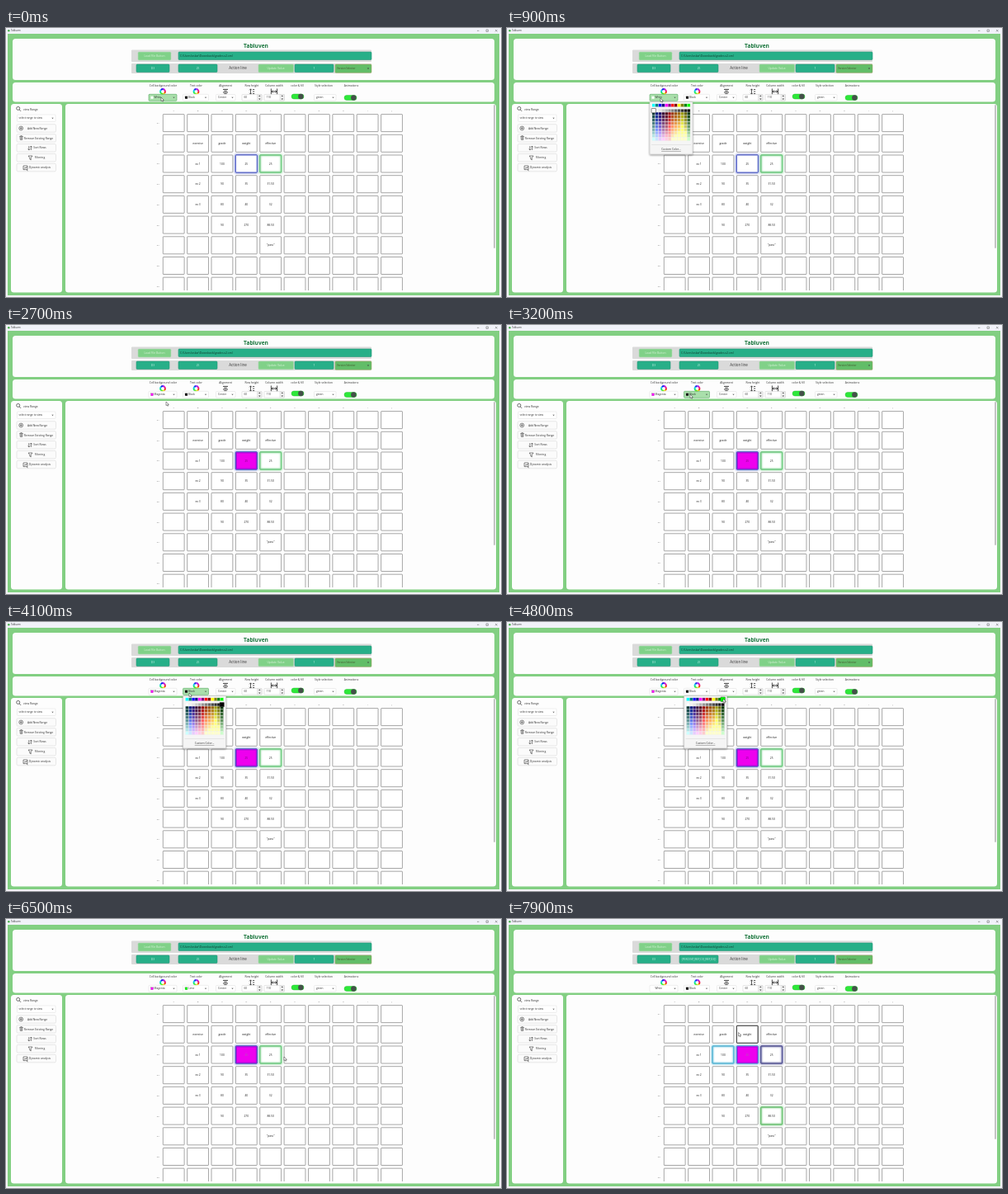
An HTML page that plays this animation: 600x326 px, repeating every 8000 ms.

```html
<!DOCTYPE html>
<html lang="en">
<head>
<meta charset="utf-8">
<title>Spreadsheet colors</title>
<style>
html, body { margin: 0; width: 100%; height: 100%; overflow: hidden; background: #f3f4f8; }
svg { display: block; width: 600px; height: 326px; }
text { font-family: "Open Sans", "Noto Sans", sans-serif; }
</style>
</head>
<body>
<svg id="stage" viewBox="0 0 600 326">
  <defs>
    <filter id="shadow" x="-20%" y="-20%" width="140%" height="150%">
      <feDropShadow dx="0" dy="1" stdDeviation="1.3" flood-opacity=".45"/>
    </filter>
    <filter id="glow" x="-30%" y="-30%" width="160%" height="160%"><feGaussianBlur stdDeviation="1"/></filter>
    <clipPath id="sheetClip"><rect x="72" y="92" width="518" height="226"/></clipPath>
    <clipPath id="valueClip"><rect x="209.5" y="43" width="46" height="12"/></clipPath>
  </defs>
  <g id="base"></g>
  <g id="live"></g>
  <path id="cursor" d="M0 0V4.6L1.1 3.7L1.9 5.3L2.7 4.9L2 3.4H3.4Z" fill="#fff" stroke="#222" stroke-width=".45"/>
</svg>
<script>
const LOOP = 8000;
const GREEN = '#82cf82', TEAL = '#27af88', LIGHT = '#80d188', INK = '#333';
const OPEN_BG = 300, PICK_BG = 2700, OPEN_TEXT = 3700, PICK_TEXT = 5800, SELECT_E3 = 7300;

const box = (x, y, w, h, fill, stroke = 'none', r = 0, lw = .6, extra = '') =>
  `<rect x="${x}" y="${y}" width="${w}" height="${h}" rx="${r}" fill="${fill}" stroke="${stroke}" stroke-width="${lw}" ${extra}/>`;
const label = (s, x, y, size = 3.4, fill = INK, extra = 'text-anchor="middle"') =>
  `<text x="${x}" y="${y + size * .36}" font-size="${size}" fill="${fill}" ${extra}>${s}</text>`;
const left = (s, x, y, size, fill) => label(s, x, y, size, fill, '');
const line = (d, stroke = INK, lw = .7) =>
  `<path d="${d}" fill="none" stroke="${stroke}" stroke-width="${lw}"/>`;
const arrow = (x, y) => `<path d="M${x - 1.2} ${y - .6}h2.4l-1.2 1.4z" fill="#444"/>`;
const combo = (x, y, w, h, fill = '#fff', stroke = '#ddd') =>
  box(x, y, w, h, fill, stroke, 1, .5) + arrow(x + w - 3.5, y + h / 2);

// Sheet
const PITCH_X = 29.37, PITCH_Y = 24.7;
const cellX = c => 190.3 + c * PITCH_X;
const cellY = r => 104.6 + r * PITCH_Y;
const cell = (c, r, fill, stroke, lw = .6, extra = '') =>
  box(cellX(c), cellY(r), 25.8, 21, fill, stroke, .5, lw, extra);
const VALUES = [
  [], ['exercise', 'grade', 'weight', 'effective'], ['ex 1', '100', '', '25'],
  ['ex 2', '90', '35', '31.50'], ['ex 3', '80', '40', '32'],
  ['', '90', '270', '88.50'], ['', '', '', '"pass"'], [], []
];
const glowCell = (c, r, color, fill = 'none') =>
  cell(c, r, 'none', color, 2, 'filter="url(#glow)" opacity=".75"') + cell(c, r, fill, color, .9);

function sheet() {
  let out = '';
  for (let c = 0; c < 10; c++) out += label('ABCDEFGHIJ'[c], cellX(c) + 12.9, 99.8, 2.5, '#666');
  VALUES.forEach((row, r) => {
    out += label('0' + (r + 1), 184.3, cellY(r) + 10.5, 2.5, '#666');
    for (let c = 0; c < 10; c++) out += cell(c, r, '#fff', '#6c6c6c');
    row.forEach((s, i) => out += label(s, cellX(i + 1) + 12.9, cellY(r) + 10.5, 3.3, '#222'));
  });
  return `<g clip-path="url(#sheetClip)">${out}</g>`;
}

function wheel(cx, cy) {
  let out = '';
  for (let i = 0; i < 8; i++) {
    const at = k => `${cx + 2.9 * Math.cos(k * Math.PI / 4)} ${cy + 2.9 * Math.sin(k * Math.PI / 4)}`;
    out += line(`M${at(i)}A2.9 2.9 0 0 1 ${at(i + 1)}`, `hsl(${i * 45 + 10} 85% 50%)`, 2);
  }
  return out;
}

function toggle(x, y) {
  return box(x, y, 15, 6, '#2ee83a', '#22b82c', 3, .4) + `<circle cx="${x + 11.3}" cy="${y + 3}" r="3.2" fill="#45504a"/>`;
}

function spinner(x, w, s) {
  return box(x, 80.5, w, 7.5, '#fff', '#ccc', .8, .5) + left(s, x + 2.5, 84.3, 3.2) +
    box(x + w - 5.5, 80.5, 5.5, 7.5, '#eee', '#ccc', .5, .4) + arrow(x + w - 2.7, 86.2) +
    `<path d="M${x + w - 3.9} 83h2.4l-1.2-1.4z" fill="#444"/>`;
}

function header() {
  return box(0, 0, 600, 7, '#f1f2f9') + '<circle cx="3.3" cy="3.2" r="1.3" fill="#4caf50"/>' +
    left('Tabluven', 6, 3.2, 2.8) +
    line('M571 3.3h2.4M582 2h2.4v2.4h-2.4zM593 2l2.5 2.5M595.5 2l-2.5 2.5', '#444', .45) +
    box(2, 7, 596, 317, GREEN) +
    box(8, 13, 584, 50, '#fdfdfd', 'none', 3.5) + box(8, 66, 584, 23.5, '#fdfdfd', 'none', 3.5) +
    box(6, 92, 62, 228.5, '#fdfdfd', 'none', 3.5) + box(72, 92, 522, 228.5, '#fdfdfd', 'none', 3.5) +
    label('Tabluven', 303, 21.3, 6.6, '#16743a', 'text-anchor="middle" font-weight="700"') +
    box(152, 26.5, 291, 14.5, '#dadada', 'none', 1) + box(152, 43, 291, 12, '#dadada', 'none', 1) +
    box(160, 29, 40, 10, LIGHT, '#b7dcba', 1.2) + label('Load File Button', 180, 34, 3.3, '#d9f2dc') +
    box(209, 29, 234, 9.5, TEAL, '#239777', 1) + left('C:\\Users\\oskar\\Downloads\\grades-v2.xml', 211, 33.8, 3.3, '#12382d') +
    box(158, 44, 40, 9.5, TEAL, '#239777', 1) + box(209, 44, 47, 9.5, TEAL, '#239777', 1) +
    label('Action line', 281, 48.8, 4.4) +
    box(306, 44, 42.5, 9.8, LIGHT, '#a6d8ab', 1.2) + label('Update Value', 327, 48.8, 3.4, '#d9f2dc') +
    box(350, 44, 47, 9.5, TEAL, '#239777', 1) + label('1', 373.5, 48.8, 3.3, '#e5fff6') +
    box(399, 44, 44, 10.3, '#62bd68', '#a3a35a', 1, .5) + left('Version Selector', 401, 49.2, 3, '#45502d') + arrow(439, 49.2);
}

function toolbar() {
  const heads = [['Cell background color', 190.5], ['Text color', 230.5], ['Alignment', 266], ['Row height', 298],
    ['Column width', 325], ['color &amp; fill', 353], ['Style selection', 385], ['Animations', 418.5]];
  return heads.map(([s, x]) => label(s, x, 70.3, 3.3)).join('') +
    wheel(190, 77) + wheel(230.5, 77) +
    line('M263 74.4h6M264.3 76.2h3.4M263 78h6M264.3 79.8h3.4', INK, .9) +
    line('M296.5 74v6M295.2 75.3l1.3-1.5 1.3 1.5M295.2 78.8l1.3 1.5 1.3-1.5M299 74.5h2.2M299 77h2.2M299 79.5h2.2', INK, .8) +
    line('M321.4 73.5v7M328.6 73.5v7M322.4 77h5.2M323.6 75.7l-1.5 1.3 1.5 1.3M326.4 75.7l1.5 1.3-1.5 1.3', INK, .9) +
    combo(254.5, 80.5, 23.5, 7.5) + left('Center', 257, 84.3, 3.2) +
    spinner(286, 24, '60') + spinner(313, 24.5, '110') + toggle(346, 80) + toggle(410, 81.5) +
    combo(373.5, 80.5, 26.5, 7.5) + left('green', 376, 84.3, 3.2);
}

function sidebar() {
  const items = ['Add New Range', 'Remove Existing Range', 'Sort Rows', 'Filtering', 'Dynamic analysis'];
  const icons = [
    'M15.8 121.5a2.4 2.4 0 1 0 4.8 0a2.4 2.4 0 1 0-4.8 0M18.2 120.1v2.8M16.8 121.5h2.8',
    'M16.4 131.4h4.2M17.6 130.6h1.8M17 131.4l.3 4h2.4l.3-4M18.5 132.3v2.2',
    'M27.8 143v5l-1.3-1.4M30.4 148v-5l1.3 1.4M27.8 148l1.3-1.4M30.4 143l-1.2 1.4',
    'M27 155h5l-1.8 2.3v2.6l-1.4-.9v-1.7z',
    'M21 167h5v4.6h-5zM22 170.5l1.2-1.5 1 1 1.2-2M25 172l1.5 1'
  ];
  const textX = [38, 39.5, 41, 41, 41];
  return line('M12.7 97.4a2 2 0 1 0 4 0a2 2 0 1 0-4 0M16.1 98.9l2 2') + left('view Range', 21, 98.4, 3.4) +
    combo(13.5, 105, 46.5, 8.5) + left('select range to view', 15.5, 109.2, 3.1) +
    items.map((s, i) => {
      const y = 121.5 + i * 11.9;
      return box(13, y - 4.8, 47.5, 9.5, '#fbfbfb', '#d3d3d3', 1.5, .5) + line(icons[i], INK, .6) +
        label(s, textX[i], y, 3.3);
    }).join('') + box(591, 93, 2, 174, '#c4c4c4', 'none', 1);
}

// Color picker
const SWATCH = 3.85;
const NAMED = 'aqua teal blue navy fuchsia purple red maroon yellow olive green lime'.split(' ');
const GRAYS = [255, 242, 230, 204, 179, 153, 128, 102, 77, 51, 26, 0];
const HUES = ['0,51,51', '0,26,128', '26,0,104', '51,0,51', '77,0,26', '153,0,0', '153,51,0',
  '153,77,0', '153,102,0', '153,153,0', '102,102,0', '0,51,0'].map(s => s.split(',').map(Number));

function gridColor(c, r) {
  const rgb = r ? HUES[c].map(v => Math.min(255, Math.round(v + 25.5 * (r - 1)))) : Array(3).fill(GRAYS[c]);
  return `rgb(${rgb})`;
}

function popup(x, px, py, current) {
  const x0 = x + 2.9;
  const swatch = (c, y, fill) => box(x0 + c * SWATCH, y, SWATCH, SWATCH, fill, '#eee', 0, .35);
  let out = box(x, 89.5, 52, 63.5, '#f5f5f5', '#bbb', .8, .5, 'filter="url(#shadow)"');
  for (let c = 0; c < 12; c++) {
    out += swatch(c, 91.8, NAMED[c]);
    for (let r = 0; r < 10; r++) out += swatch(c, 98.2 + r * SWATCH, gridColor(c, r));
  }
  const hover = Math.floor((px - x0) / SWATCH);
  if (py > 90 && hover >= 0 && hover < 12)
    out += box(x0 + hover * SWATCH - .9, 90.9, 5.6, 5.6, NAMED[hover], '#555', .3, .5);
  else
    out += box(x0 + current * SWATCH - .8, 97.5, 5.3, 5.3, gridColor(current, 0), '#444', .3, .6);
  return out + line(`M${x + 2} 141.5h48`, '#d5d5d5', .5) +
    label('Custom Color...', x + 26, 147.2, 3.3, INK, 'text-anchor="middle" text-decoration="underline"');
}

// Pointer: time, x, y
const PATH = [[0, 188, 84], [900, 186, 85], [1500, 186, 86], [2000, 201, 93], [2250, 201, 93], [2500, 194, 93],
  [2700, 194, 93], [3100, 222, 84], [4100, 222, 86], [4550, 225, 93], [4750, 262, 93], [5800, 262, 93],
  [6350, 337, 167], [6850, 337, 167], [7200, 321, 165], [7400, 320, 165], [7800, 280.5, 137.5]];

function pointer(t) {
  const i = PATH.findIndex(p => p[0] > t);
  if (i < 0) return PATH[PATH.length - 1].slice(1);
  const [t0, x0, y0] = PATH[i - 1], [t1, x1, y1] = PATH[i];
  const u = (t - t0) / (t1 - t0), k = u * u * (3 - 2 * u);
  return [x0 + (x1 - x0) * k, y0 + (y1 - y0) * k];
}

function picker(x, w, name, color, px, py) {
  const hover = px > x && px < x + w && py > 80 && py < 89;
  return combo(x, 80.3, w, 8, hover ? '#a9dfab' : '#fff', hover ? '#3f9a4b' : '#ddd') +
    box(x + 2.5, 82.8, 3, 3, color, color === 'white' ? 'none' : '#777', 0, .3) + left(name, x + 6.5, 84.3, 3.2);
}

function live(t, px, py) {
  const onE3 = t >= SELECT_E3, filled = t >= PICK_BG, lime = t >= PICK_TEXT;
  const bg = filled && !onE3 ? ['Magenta', 'fuchsia'] : ['White', 'white'];
  const fg = lime && !onE3 ? ['Lime', 'lime'] : ['Black', 'black'];
  let out = label(onE3 ? 'E3' : 'D3', 178, 48.8, 3.3, '#d3f5ea') +
    `<g clip-path="url(#valueClip)">${label(onE3 ? '{PERCENT,{REF,C3},{REF,D3}}' : '25', 232.5, 48.8, 3.2, '#d3f5ea')}</g>` +
    picker(173, 34, ...bg, px, py) + picker(214.5, 31, ...fg, px, py);

  out += glowCell(3, 2, onE3 ? '#3d9be0' : '#3a4bc4', filled ? '#ee00ee' : '#fff');
  if (filled) out += box(cellX(3) + 1, cellY(2) + 1, 23.8, 19, 'none', '#a30fd6', 0, .9);
  out += label('25', cellX(3) + 12.9, cellY(2) + 10.5, 3.3,
    lime ? '#a56ba8' : filled ? '#7a0a80' : '#222');
  out += onE3
    ? glowCell(2, 2, '#45b8de') + glowCell(4, 2, '#43438f') + glowCell(4, 5, '#5fc468')
    : glowCell(4, 2, '#62cf78');

  const c = Math.floor((px - cellX(0)) / PITCH_X), r = Math.floor((py - cellY(0)) / PITCH_Y);
  if (c >= 0 && r >= 0 && px - cellX(c) < 25.8 && py - cellY(r) < 21 && !(r === 2 && c > 1 && c < 5) && t > PICK_TEXT)
    out += cell(c, r, 'none', '#333', .9);

  if (t >= OPEN_BG && t < PICK_BG) out += popup(173, px, py, 0);
  if (t >= OPEN_TEXT && t < PICK_TEXT) out += popup(214.6, px, py, 11);
  return out;
}

const $ = id => document.getElementById(id);
$('base').innerHTML = header() + toolbar() + sidebar() + sheet();

let shown = '';
function render(now) {
  const t = Math.floor((now % LOOP) / 100) * 100;
  const [x, y] = pointer(t);
  const markup = live(t, x, y);
  if (markup !== shown) $('live').innerHTML = shown = markup;
  $('cursor').setAttribute('transform', `translate(${x} ${y})`);
}

const start = performance.now();
function tick() {
  render(performance.now() - start);
  requestAnimationFrame(tick);
}
tick();
</script>
</body>
</html>
```
